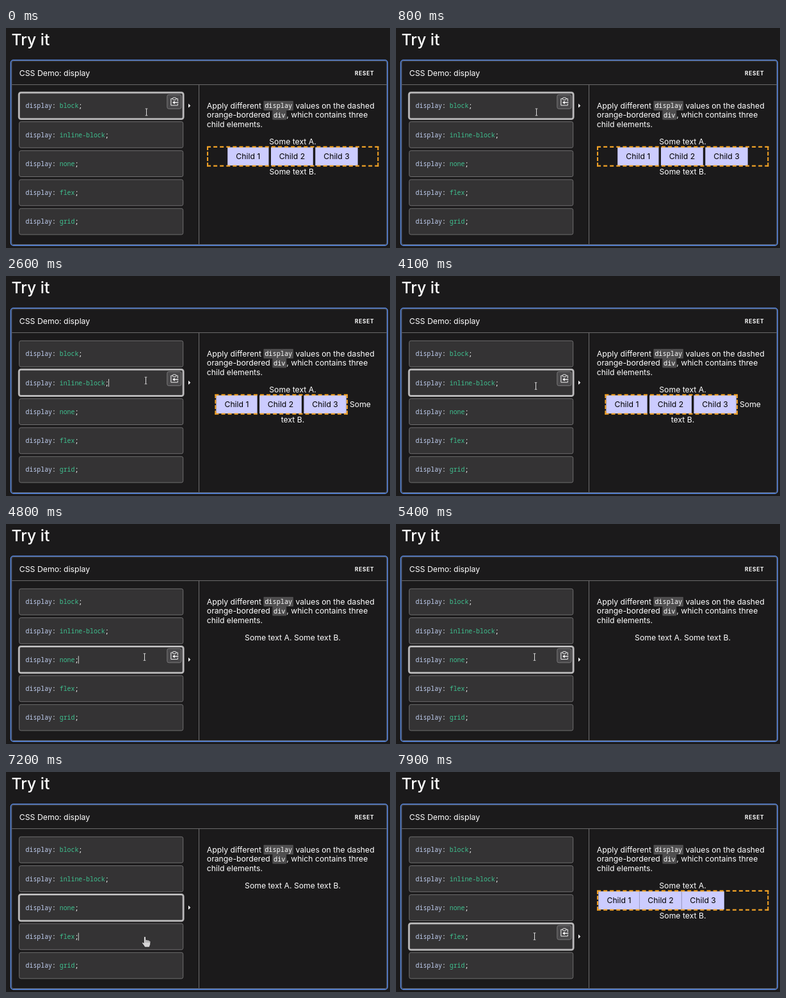
These frames come from a looping animation (600x344 px, 8000 ms). An HTML page with a canvas:

```html
<!DOCTYPE html>
<html lang="en">
<head>
<meta charset="utf-8">
<title>Display demo</title>
<style>
html, body { margin: 0; width: 100%; height: 100%; overflow: hidden; background: #1b1a1b; }
canvas { display: block; width: 600px; height: 344px; }
</style>
</head>
<body>
<canvas id="stage"></canvas>
<script>
const W = 600, H = 344, LOOP = 8000, STEP = 100;
const canvas = document.getElementById('stage');
const dpr = window.devicePixelRatio || 1;
canvas.width = W * dpr;
canvas.height = H * dpr;
const ctx = canvas.getContext('2d');

const SANS = 'Inter, sans-serif', MONO = '"Noto Sans Mono", monospace';
const BODY = `12.22px ${SANS}`, HEAD = `12.3px ${SANS}`;
const CODE = `500 9.86px ${MONO}`, CHIP = `500 10.27px ${MONO}`;
const WHITE = '#fff', LINE = '#6f6e6f', LILAC = '#ccccff', ORANGE = '#f0a126';

const values = ['block', 'inline-block', 'none', 'flex', 'grid'];
const ROW = { x: 20.7, y: 101.3, w: 256, h: 40.7, pitch: 45.25 };
const rowTop = i => ROW.y + i * ROW.pitch;

// Pointer path: time, x, y
const path = [
  [0, 219.5, 131.5], [1600, 219.5, 131.5], [2000, 218.5, 163.5], [2700, 218.5, 163.5],
  [3200, 218.5, 172], [4300, 218.5, 172], [4700, 216.5, 208], [6100, 216.5, 208],
  [6700, 216.5, 257], [LOOP, 216.5, 257]
];
// Mouse press and release on each row
const clicks = [
  { row: 1, down: 2100, up: 2300 },
  { row: 2, down: 4700, up: 4800 },
  { row: 3, down: 7100, up: 7300 }
];

const ease = k => k * k * (3 - 2 * k);

function pointerAt(t) {
  const i = path.findIndex(p => p[0] > t);
  const [t0, x0, y0] = path[i - 1], [t1, x1, y1] = path[i];
  const k = ease((t - t0) / (t1 - t0));
  return { x: x0 + (x1 - x0) * k, y: y0 + (y1 - y0) * k };
}

function text(str, x, y, font, color = WHITE, align = 'left') {
  ctx.font = font;
  ctx.fillStyle = color;
  ctx.textAlign = align;
  ctx.fillText(str, x, y);
  return x + ctx.measureText(str).width;
}

function box(x, y, w, h, r, fill, stroke, width = 1) {
  ctx.beginPath();
  ctx.roundRect(x, y, w, h, r);
  if (fill) { ctx.fillStyle = fill; ctx.fill(); }
  if (stroke) { ctx.strokeStyle = stroke; ctx.lineWidth = width; ctx.stroke(); }
}

function line(x0, y0, x1, y1, color = LINE, width = 1) {
  ctx.beginPath();
  ctx.moveTo(x0, y0);
  ctx.lineTo(x1, y1);
  ctx.strokeStyle = color;
  ctx.lineWidth = width;
  ctx.stroke();
}

function shape(points, fill) {
  ctx.beginPath();
  points.forEach(([x, y]) => ctx.lineTo(x, y));
  ctx.closePath();
  ctx.fillStyle = fill;
  ctx.fill();
}

function drawFrame() {
  ctx.fillStyle = '#1b1a1b';
  ctx.fillRect(0, 0, W, H);
  text('Try it', 8.5, 27, `500 24.6px ${SANS}`);
  line(9, 88.6, 595, 88.6);
  line(301.5, 89, 301.5, 338);
  box(8.9, 51.7, 586, 286.8, 3, null, '#5c5b5e', 0.9);
  box(7.5, 50.3, 588.6, 289.6, 4, null, '#5b8ae0', 1.6);
  text('CSS Demo: display', 20.7, 74.5, HEAD);
  ctx.letterSpacing = '0.7px';
  text('RESET', 545, 73.6, `700 8.4px ${SANS}`);
  ctx.letterSpacing = '0px';
}

function drawPasteButton(y) {
  box(251.8, y + 3, 22, 22, 2.5, '#49484a', '#79787a');
  ctx.save();
  ctx.translate(256.8, y + 7.2);
  box(1, 2, 10.5, 10.5, 0.8, null, '#e8e8e8', 1.1);
  box(3.8, 0.4, 5, 3.4, 0.8, '#49484a', '#e8e8e8', 1);
  line(6, 8, 13, 8, '#49484a', 3.6);
  line(5.5, 8, 12.5, 8, WHITE, 1.3);
  shape([[3.4, 8], [6.8, 5.2], [6.8, 10.8]], WHITE);
  ctx.restore();
}

function drawRow(i, selected, hovered, caret) {
  const y = rowTop(i);
  box(ROW.x, y, ROW.w, ROW.h, 2.5, '#343334', selected ? null : LINE);
  if (selected) {
    box(ROW.x - 0.4, y - 0.3, ROW.w + 0.8, ROW.h + 0.6, 3, null, '#a3a2a3', 3);
    box(ROW.x - 0.4, y - 0.3, ROW.w + 0.8, ROW.h + 0.6, 3, null, '#d2d1d2', 1);
    const m = y + 20.2;
    shape([[285, m - 3.2], [288.3, m], [285, m + 3.2]], WHITE);
    if (hovered) drawPasteButton(y);
  }
  const base = y + 24;
  let x = text('display', 30.6, base, CODE, '#c1cff1');
  x = text(': ', x, base, CODE);
  x = text(values[i], x, base, CODE, '#3fc08f');
  x = text(';', x, base, CODE);
  if (caret) line(x, y + 14.5, x, y + 26.5, '#cfcfcf', 1);
}

function chip(str, x, y) {
  ctx.font = CHIP;
  const w = ctx.measureText(str).width + 3.4;
  box(x, y - 11.5, w, 14.8, 1, '#4e4d4e');
  text(str, x + 1.7, y - 0.3, CHIP);
  return x + w;
}

function drawIntro() {
  let x = text('Apply different ', 313.8, 125.6, BODY);
  x = chip('display', x, 125.6);
  text(' values on the dashed', x, 125.6, BODY);
  x = text('orange-bordered ', 313.8, 140.3, BODY);
  x = chip('div', x, 140.3);
  text(', which contains three', x, 140.3, BODY);
  text('child elements.', 313.8, 155, BODY);
}

// One dashed edge, starting and ending on a full dash
function dashEdge(x0, y0, x1, y1) {
  const len = Math.hypot(x1 - x0, y1 - y0), dash = 6;
  const gaps = Math.max(1, Math.round((len - dash) / 10.2));
  ctx.setLineDash([dash, (len - dash) / gaps - dash]);
  line(x0, y0, x1, y1, ORANGE, 2.1);
  ctx.setLineDash([]);
}

function drawDashed(l, r) {
  const t = 184.9, b = 216.6;
  dashEdge(l, t + 1, r, t + 1);
  dashEdge(l, b - 1, r, b - 1);
  dashEdge(l + 1, t, l + 1, b);
  dashEdge(r - 1, t, r - 1, b);
}

function drawChildren(first, gap, edge) {
  let x = first;
  [64.3, 65.8, 66.4].forEach((w, i) => {
    box(x, 186.6, w, 28.4, 0, LILAC);
    if (edge && i) line(x - 0.2, 187, x - 0.2, 215, '#a3a2cc', 0.8);
    text('Child ' + (i + 1), x + w / 2, 205.1, BODY, '#000', 'center');
    x += w + gap;
  });
}

function drawOutput(mode) {
  const mid = (str, y) => text(str, 448, y, BODY, WHITE, 'center');
  if (mode === 'none') {
    mid('Some text A. Some text B.', 181.7);
    return;
  }
  mid('Some text A.', 181.7);
  if (mode === 'inline-block') {
    drawChildren(328.3, 3.5);
    drawDashed(326.4, 534);
    text('Some', 537, 205.2, BODY);
    mid('text B.', 228.8);
    return;
  }
  if (mode === 'flex') drawChildren(316.3, 0, true);
  else drawChildren(346.2, 3.5);
  drawDashed(314, 582.3);
  mid('Some text B.', 228.8);
}

function drawBeam({ x, y }) {
  const color = '#dcdcdc';
  line(x, y - 5, x, y + 5, color);
  for (const d of [-5.3, 5.3]) line(x - 1.8, y + d, x + 1.8, y + d, color, 0.9);
}

function drawHand({ x, y }) {
  ctx.save();
  ctx.translate(x, y);
  ctx.beginPath();
  ctx.moveTo(-1.2, 1);
  ctx.quadraticCurveTo(0.6, -0.8, 2, 1);
  ctx.lineTo(2.2, 5.5);
  ctx.quadraticCurveTo(4, 4.6, 4.9, 6);
  ctx.quadraticCurveTo(6.6, 5.2, 7.3, 6.8);
  ctx.quadraticCurveTo(9.2, 6.4, 9.4, 8.4);
  ctx.lineTo(9.2, 12.2);
  ctx.lineTo(7.6, 17);
  ctx.lineTo(0.4, 17);
  ctx.quadraticCurveTo(-1.4, 13.8, -4, 10.6);
  ctx.quadraticCurveTo(-4.2, 8, -1.2, 10.2);
  ctx.closePath();
  ctx.fillStyle = '#d6d5d6';
  ctx.strokeStyle = '#1b1a1b';
  ctx.lineWidth = 0.8;
  ctx.fill();
  ctx.stroke();
  for (const fx of [2.2, 4.7, 7.1]) line(fx, 6.2, fx, 9.8, '#555', 0.6);
  ctx.restore();
}

function draw(t) {
  const pressed = clicks.filter(c => t >= c.down).pop();
  const released = clicks.filter(c => t >= c.up).pop();
  const selected = released ? released.row : 0;
  const pointer = pointerAt(t);
  const top = rowTop(selected);
  const hovered = pointer.y >= top && pointer.y <= top + ROW.h;
  const caretOn = pressed && (t < pressed.up || Math.floor((t - pressed.up) / 500) % 2 === 0);

  ctx.setTransform(dpr, 0, 0, dpr, 0, 0);
  drawFrame();
  values.forEach((_, i) => drawRow(i, i === selected, hovered, caretOn && pressed.row === i));
  drawIntro();
  drawOutput(values[selected]);
  if (hovered) drawBeam(pointer);
  else drawHand(pointer);
}

const start = performance.now();
function tick() {
  const t = (performance.now() - start) % LOOP;
  draw(Math.floor(t / STEP) * STEP);
  requestAnimationFrame(tick);
}
tick();
</script>
</body>
</html>
```
